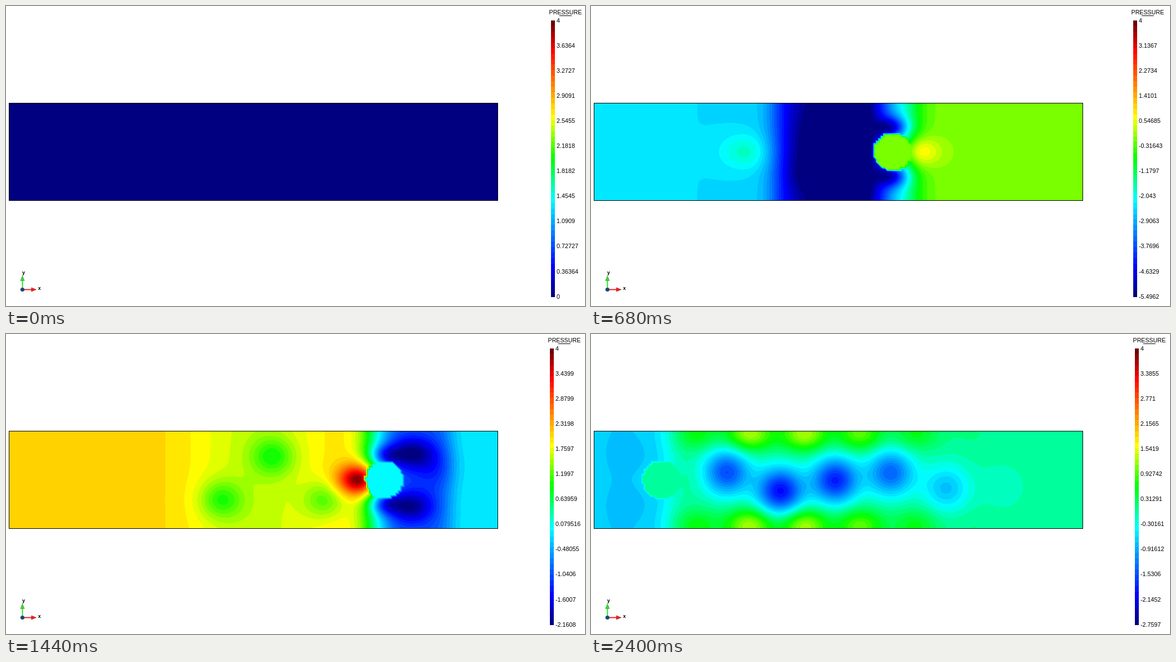
An HTML page with a canvas that plays this animation: 1039 by 539 pixels, repeating every 2440 ms.

```html
<!DOCTYPE html>
<html lang="en">
<head>
<meta charset="utf-8">
<title>Pressure around an oscillating cylinder</title>
<style>
html, body { margin: 0; width: 100%; height: 100%; overflow: hidden; background: #fff; }
canvas { display: block; }
</style>
</head>
<body>
<canvas id="stage" width="1039" height="539"></canvas>
<script>
const ctx = document.getElementById('stage').getContext('2d');
const STEP = 40, STEPS = 61, BANDS = 50, TOP = 4;
const X0 = 6, Y0 = 175, W = 876, H = 174;
const NX = 200, NY = 40, CELL = W / NX;
const CY = 262, RADIUS = 34.2;
const MID = 443, SWING = 318, TURN = 29, RATE = Math.PI / 30;

// Lower end of the colour scale: [step, pressure]
const lows = [[1, -1.9], [11, -5.78606], [23, -5.20624], [36, -2.16076],
  [45, -4.624715], [52, -5.18175], [60, -2.75967]];

const { sin, cos, exp, tanh, acos, abs, floor, round } = Math;
const clamp = (v, a, b) => Math.min(b, Math.max(a, v));
const mix = (a, b, k) => a + (b - a) * k;
const rise = z => 1 / (1 + exp(-z));

// Piecewise linear rows: [position, value, ...]
function along(rows, at) {
  let i = 0;
  while (i < rows.length - 2 && at > rows[i + 1][0]) i++;
  const a = rows[i], b = rows[i + 1], k = (at - a[0]) / (b[0] - a[0]);
  return a.slice(1).map((v, j) => mix(v, b[j + 1], k));
}

// Steps between the cylinder passing x and its turning point on the right
const passing = x => acos(clamp((x - MID) / SWING, -1, 1)) / RATE;

function flowAt(n) {
  const phase = (n - TURN) * RATE;
  const cx = MID + SWING * cos(phase), v = -sin(phase), dir = Math.sign(v);
  const drag = v * v;
  const surge = Math.max(0, sin(2 * phase)) * abs(v);
  const blobs = [];
  const add = (x, y, amp, rx, ry = rx) => blobs.push({ x, y, amp, rx, ry });

  // Stagnation in front, suction on both flanks, twin eddies while speeding up
  add(cx + 42 * dir, CY, 1.5 * drag + 2.6 * surge, 38, 27);
  for (const side of [-1, 1]) {
    add(cx, CY + 44 * side, -2.3 * drag, 27, 19);
    add(cx - 48 * dir, CY + 48 * side, -1.6 * surge, 38, 28);
  }

  // Starting eddy pair that follows the first stroke
  const pair = exp(-(((n - 21) / 8) ** 2)), px = 262 + 25 * (n - 11);
  add(px, 234, -0.7 * pair, 42);
  add(px, 291, -0.5 * pair, 42);
  add(px - 135, CY, 0.9 * pair, 43, 31);

  // Weak eddies left by the stroke to the right
  for (let k = 0; k < 3; k++) {
    const x = 386 + 93 * k, age = n - TURN + passing(x);
    if (age > 0) {
      const y = CY + (k % 2 ? -42 : 36);
      add(x, y, -0.75 * tanh(age / 12) * rise((cx - x - 60) / 10), 38, 34);
    }
  }

  // Vortex street left by the stroke back, with highs at the walls
  for (let k = 0; k < 6; k++) {
    const home = 237 + 100 * k, pass = passing(home), age = n - TURN - pass;
    if (age <= 0) continue;
    const x = home + 70 * exp(-age / 4);
    const sway = 28 * exp(-age / 40) * cos((age - 2.5) * Math.PI / 9);
    const power = 5 * sin(pass * RATE) ** 2 * exp(-age / 16) * rise((x - cx - 80) / 12);
    add(x, CY + 2 + (k % 2 ? -sway : sway), -power, 41);
    const wall = 0.7 * power * rise((age - 9) / 1.5);
    add(x - 55, Y0 + 4, wall, 42, 31);
    add(x - 55, Y0 + H - 4, wall, 42, 31);
  }

  const inlet = 2.75 * sin((n - 27.5) * RATE);
  const shift = 33 * tanh(3 * v), wake = cx - dir * (45 + 30 * drag);
  const old = 0.55 * rise((cx - 500) / 50);
  const profile = x =>
    inlet * (1 - tanh((x - cx - shift) / 28)) / 2
    - 2.2 * drag * exp(-(((x - wake) / 65) ** 4))
    - 3.1 * pair * exp(-(((x - px) / 85) ** 4))
    - old * exp(-(((x - 450) / 130) ** 2));

  return { cx, profile, blobs, min: along(lows, n)[0] };
}

// Rainbow scale: dark blue, blue, cyan, green, yellow, red, dark red
const stops = [[0, 0, 0, 128], [0.1, 0, 0, 255], [0.35, 0, 255, 255], [0.5, 0, 255, 0],
  [0.65, 255, 255, 0], [0.9, 255, 0, 0], [1, 110, 0, 0]];
const palette = Array.from({ length: BANDS },
  (_, i) => along(stops, i / (BANDS - 1)).map(round));

const nodes = new Float32Array((NX + 1) * (NY + 1));
const image = ctx.createImageData(W, H);
const pixels = new Uint32Array(image.data.buffer);
const BLACK = 0xff000000;
const packed = palette.map(([r, g, b]) => (BLACK | b << 16 | g << 8 | r) >>> 0);

function fillNodes({ cx, profile, blobs }) {
  for (let i = 0; i <= NX; i++) {
    const x = X0 + i * CELL, level = profile(x);
    for (let j = 0; j <= NY; j++) {
      const y = Y0 + j * CELL;
      let p = 0;
      if (Math.hypot(x - cx, y - CY) >= RADIUS) {
        p = level;
        for (const b of blobs) {
          const u = (x - b.x) / b.rx, v = (y - b.y) / b.ry;
          p += b.amp * exp(-u * u - v * v);
        }
      }
      nodes[j * (NX + 1) + i] = p;
    }
  }
}

// Linear triangles between nodes, cut into flat colour bands
function drawField(min) {
  const scale = BANDS / (TOP - min);
  for (let y = 0, o = 0; y < H; y++) {
    const gy = (y + 0.5) / CELL, j = Math.min(NY - 1, floor(gy)), v = gy - j;
    for (let x = 0; x < W; x++, o++) {
      const gx = (x + 0.5) / CELL, i = floor(gx), u = gx - i;
      const q = j * (NX + 1) + i;
      const a = nodes[q], b = nodes[q + 1], d = nodes[q + NX + 1], c = nodes[q + NX + 2];
      const p = u > v ? a + (b - a) * u + (c - b) * v : a + (d - a) * v + (c - d) * u;
      pixels[o] = p > TOP ? BLACK : packed[clamp(floor((p - min) * scale), 0, BANDS - 1)];
    }
  }
  ctx.putImageData(image, X0, Y0);
  ctx.strokeStyle = '#000';
  ctx.lineWidth = 1;
  ctx.strokeRect(X0 - 0.5, Y0 - 0.5, W + 1, H + 1);
}

function text(s, x, y, font) {
  ctx.font = font + ' "Liberation Sans", Arial, sans-serif';
  ctx.fillStyle = '#000';
  ctx.fillText(s, x, y);
}

function drawScale(min) {
  const x = floor(clamp(979.4 + 1.2 * min, 973, 978)), top = 26, size = 496.5;
  const edge = i => round(top + size * (1 - i / BANDS));
  palette.forEach((rgb, i) => {
    ctx.fillStyle = `rgb(${rgb})`;
    ctx.fillRect(x, edge(i + 1), 7, edge(i) - edge(i + 1));
  });
  text('PRESSURE', x - 3.5, 15, '10.7px');
  ctx.fillRect(x + 15, 17, 22, 1);
  for (let i = 0; i < 12; i++) {
    const value = mix(TOP, min, i / 11);
    text(String(+value.toPrecision(5)), x + 10, 29.5 + i * 45.1, '10.8px');
  }
}

function arrow(angle, color) {
  ctx.save();
  ctx.translate(29.5, 509.5);
  ctx.rotate(angle);
  ctx.fillStyle = color;
  ctx.fillRect(0, -1, 17, 2);
  ctx.beginPath();
  ctx.moveTo(25, 0);
  ctx.lineTo(16, -3.7);
  ctx.lineTo(16, 3.7);
  ctx.closePath();
  ctx.fill();
  ctx.strokeStyle = 'rgba(0,0,0,.35)';
  ctx.lineWidth = 0.7;
  ctx.stroke();
  ctx.restore();
}

function drawAxes() {
  arrow(0, '#f02020');
  arrow(-Math.PI / 2, '#30e030');
  ctx.fillStyle = '#174a78';
  ctx.beginPath();
  ctx.arc(29.5, 509.5, 3.6, 0, 7);
  ctx.fill();
  text('y', 29, 482, 'bold 9px');
  text('x', 57.5, 510, 'bold 9px');
}

const still = { cx: MID - SWING, profile: () => 0, blobs: [], min: 0 };

function draw(n) {
  const flow = n ? flowAt(n) : still;
  ctx.fillStyle = '#fff';
  ctx.fillRect(0, 0, 1039, 539);
  fillNodes(flow);
  drawField(flow.min);
  drawScale(flow.min);
  drawAxes();
}

let shown = -1;
const start = performance.now();
function tick() {
  const n = floor((performance.now() - start) / STEP) % STEPS;
  if (n !== shown) draw(shown = n);
  requestAnimationFrame(tick);
}
tick();
</script>
</body>
</html>
```
